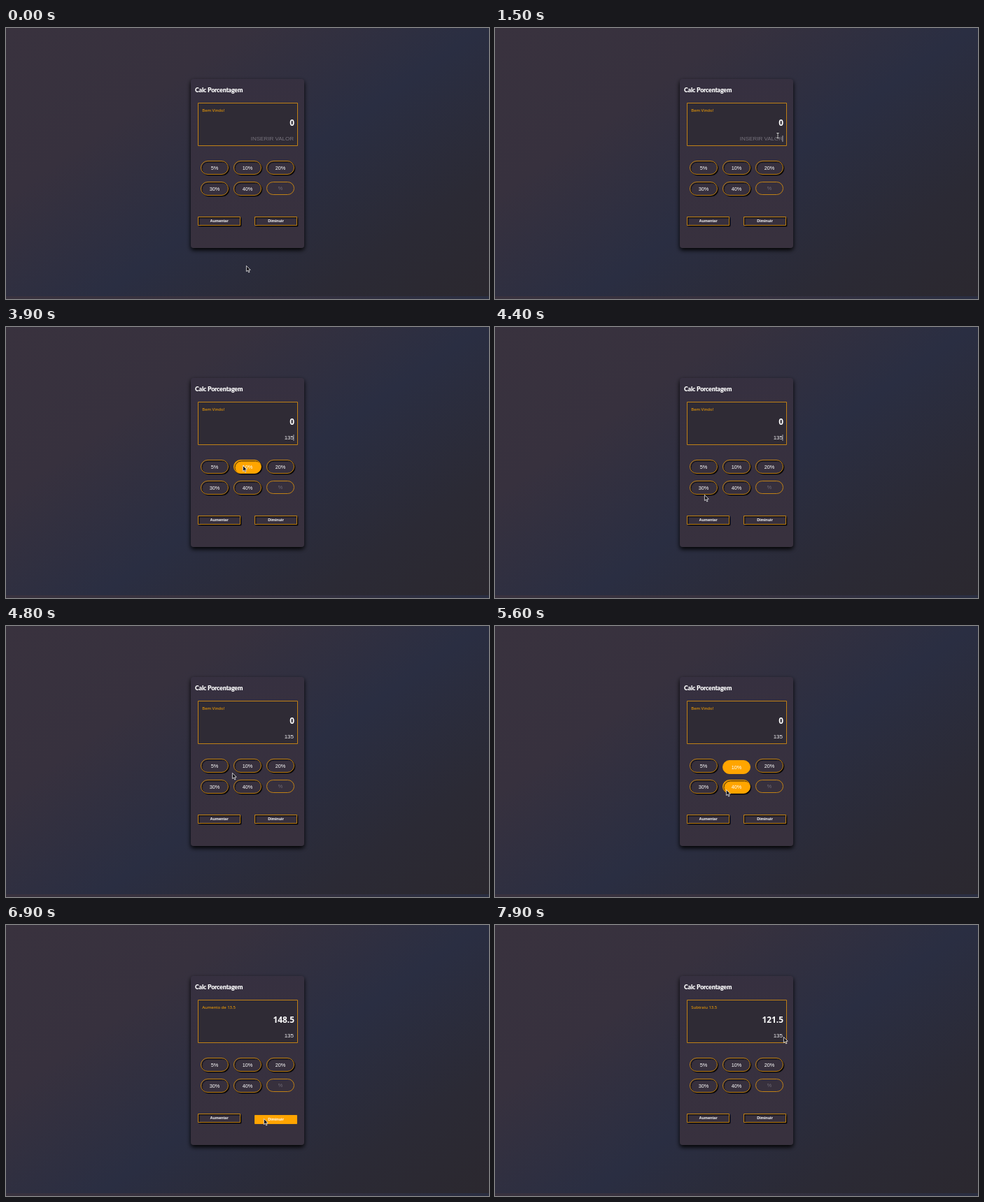
Write an HTML page with a canvas that moves like this. It is 690 by 388 pixels and loops after 8000 ms.

```html
<!DOCTYPE html>
<html lang="pt-BR">
<head>
<meta charset="utf-8">
<title>Calc</title>
<style>
  html, body { margin: 0; width: 100%; height: 100%; overflow: hidden; background: #332f3c; }
  canvas { display: block; width: 690px; height: 388px; }
</style>
</head>
<body>
<canvas id="stage"></canvas>
<script>
const W = 690, H = 388, PAGE = 384, LOOP = 8000, STEP = 100;
const ORANGE = '#ffa500', EDGE = '#cf8912', WHITE = '#fff', FACE = '#37303d';
const ARIAL = '"Liberation Sans", Arial, sans-serif';
const HUMAN = '"Noto Sans", sans-serif';

const canvas = document.getElementById('stage');
const ctx = canvas.getContext('2d');
const ratio = window.devicePixelRatio || 1;
canvas.width = W * ratio;
canvas.height = H * ratio;

// Moments of the session, in ms
const focusField = 1500, press10 = 5200, pressAdd = 6300, pressCut = 6900, blur = 7600;
const keyTimes = [2300, 2500, 2700];

// Each sweep eases along a quadratic curve: from, to, bend point, end point
const home = { x: 343, y: 340 };
const sweep = (from, to, bendX, bendY, x, y) => ({ from, to, bendX, bendY, x, y });
const sweeps = [
  sweep(700, focusField, 596, 290, 404, 154),
  sweep(3200, 3900, 190, 226, 338, 198),
  sweep(3900, 4300, 440, 200, 284, 238),
  sweep(4300, 4800, 370, 250, 323, 210),
  sweep(4800, press10, 332, 204, 341, 206),
  sweep(5500, 5600, 336, 220, 330, 234),
  sweep(5600, pressAdd, 240, 300, 295, 277),
  sweep(6400, pressCut, 330, 283, 368, 277),
  sweep(7100, 7700, 425, 235, 412, 160)
];

function pointerAt(t) {
  let p = home;
  for (const s of sweeps) {
    if (t <= s.from) break;
    const k = Math.min(1, (t - s.from) / (s.to - s.from));
    const u = (1 - Math.cos(Math.PI * k)) / 2;
    const curve = (a, b, c) => Math.round((1 - u) ** 2 * a + 2 * u * (1 - u) * b + u * u * c);
    p = { x: curve(p.x, s.bendX, s.x), y: curve(p.y, s.bendY, s.y) };
  }
  return p;
}

const pills = ['5%', '10%', '20%', '30%', '40%', '%'].map((label, i) => ({
  label, x: 278.5 + 47 * (i % 3), y: 190.5 + 30 * Math.floor(i / 3),
  w: 39, h: 19, r: 9.5, font: '7.35px ' + ARIAL, drop: 2.6
}));
const custom = Object.assign(pills.pop(), { h: 18 });
const bars = ['Aumentar', 'Diminuir'].map((label, i) => ({
  label, x: 274.5 + 81 * i, y: 270.5, w: 60, h: 12, r: 0, font: 'bold 5.6px ' + ARIAL, drop: 1.8
}));
const buttons = [...pills, ...bars];
const field = { x: 278, y: 150, w: 133, h: 17 };

const inside = (p, b) => p.x >= b.x && p.x <= b.x + b.w && p.y >= b.y && p.y <= b.y + b.h;

function focusedAt(t) {
  if (t >= blur || t < focusField) return null;
  if (t >= pressCut) return bars[1];
  if (t >= pressAdd) return bars[0];
  return t >= press10 ? pills[1] : field;
}

// The caret blinks every 600 ms, counted from the last key
function caretOn(t) {
  if (focusedAt(t) !== field) return false;
  const since = t - [focusField + STEP, ...keyTimes].filter(k => k <= t).pop();
  return !(since >= 0) || Math.floor(since / 600) % 2 === 0;
}

function text(str, x, y, font, color, align = 'left', spacing = 0) {
  ctx.font = font;
  ctx.fillStyle = color;
  ctx.textAlign = align;
  ctx.letterSpacing = spacing + 'px';
  ctx.fillText(str, x, y);
}

function box(b, fill, stroke, dy = 0) {
  ctx.beginPath();
  ctx.roundRect(b.x, b.y + dy, b.w, b.h, b.r || 0);
  ctx.fillStyle = fill;
  ctx.fill();
  if (!stroke) return;
  ctx.strokeStyle = stroke;
  ctx.lineWidth = 0.9;
  ctx.stroke();
}

function shadow(size, dx, dy, color) {
  ctx.shadowColor = color;
  ctx.shadowBlur = size * ratio;
  ctx.shadowOffsetX = dx * ratio;
  ctx.shadowOffsetY = dy * ratio;
}
const noShadow = () => shadow(0, 0, 0, 'transparent');

function fade(x0, y0, x1, y1, stops) {
  const g = ctx.createLinearGradient(x0, y0, x1, y1);
  for (const [at, color] of stops) g.addColorStop(at, color);
  return g;
}

function background() {
  const angle = 145 * Math.PI / 180;
  const sx = Math.sin(angle), sy = -Math.cos(angle);
  const half = (W * sx + PAGE * sy) / 2;
  ctx.fillStyle = fade(
    W / 2 - sx * half, PAGE / 2 - sy * half, W / 2 + sx * half, PAGE / 2 + sy * half,
    [[0, '#39323e'], [0.28, '#37313e'], [0.55, '#2a2e42'], [0.8, '#2b2a35'], [1, '#2b282f']]
  );
  ctx.fillRect(0, 0, W, PAGE);
  ctx.save();
  ctx.translate(0, PAGE);
  ctx.fillRect(0, 0, W, H - PAGE);
  ctx.restore();
}

function panel() {
  shadow(6, 0, 3, '#000');
  box({ x: 264, y: 73, w: 162, h: 242, r: 4 }, fade(264, 73, 290, 315, [[0, '#363040'], [1, '#38313e']]));
  noShadow();
  text('Calc Porcentagem', 270, 92, '900 8.8px Lato, sans-serif', WHITE, 'left', -0.2);
  box({ x: 274.5, y: 107.5, w: 142, h: 61 }, '#2f2b35', EDGE);
}

function drawButton(b, t, p) {
  const pressed = focusedAt(t) === b;
  const dy = pressed ? 2 : 0;
  const lit = pressed || inside(p, b);
  if (!pressed) shadow(0.8, 1.3, 1.3, '#000');
  box(b, lit ? ORANGE : FACE, lit ? ORANGE : EDGE, dy);
  noShadow();
  text(b.label, b.x + b.w / 2, b.y + b.h / 2 + dy + b.drop, b.font, WHITE, 'center');
}

function display(t) {
  let note = 'Bem Vindo!', total = '0';
  if (t > pressCut) [note, total] = ['Subtraiu 13.5', '121.5'];
  else if (t > pressAdd) [note, total] = ['Aumento de 13.5', '148.5'];
  text(note, 280.3, 119.8, '500 5.95px ' + HUMAN, ORANGE);
  text(total, 412, 140, 'bold 11.9px ' + HUMAN, WHITE, 'right');

  const typed = '135'.slice(0, keyTimes.filter(k => t >= k).length);
  text(typed || 'INSERIR VALOR', 411, 161, '8.02px ' + ARIAL, typed ? '#f0eff1' : '#77737d', 'right');
  if (caretOn(t)) {
    ctx.fillStyle = '#d8d6dc';
    ctx.fillRect(410.6, 154, 0.7, 9);
  }
}

function arrow({ x, y }) {
  const tail = [[0.4, 0.4], [0.4, 8.6], [2.3, 7], [3.7, 10], [5, 9.4], [3.7, 6.5], [6.2, 6.3]];
  ctx.beginPath();
  tail.forEach(([px, py]) => ctx.lineTo(x + px, y + py));
  ctx.closePath();
  ctx.fillStyle = '#17151a';
  ctx.fill();
  ctx.strokeStyle = '#e8e8ea';
  ctx.lineWidth = 0.8;
  ctx.lineJoin = 'round';
  ctx.stroke();
}

function beam({ x, y }) {
  for (const [color, width] of [['#18161b', 2], ['#e8e8ea', 0.9]]) {
    ctx.beginPath();
    for (const dy of [-3.5, 3.5]) {
      ctx.moveTo(x - 1.7, y + dy);
      ctx.lineTo(x + 1.7, y + dy);
    }
    ctx.moveTo(x, y - 3.5);
    ctx.lineTo(x, y + 3.5);
    ctx.strokeStyle = color;
    ctx.lineWidth = width;
    ctx.stroke();
  }
}

function draw(now) {
  const t = Math.floor((now % LOOP) / STEP) * STEP;
  const p = pointerAt(t);
  ctx.setTransform(ratio, 0, 0, ratio, 0, 0);
  background();
  panel();
  display(t);
  buttons.forEach(b => drawButton(b, t, p));
  box(custom, FACE, EDGE);
  text(custom.label, 392, 232, '7.2px ' + ARIAL, '#706a76', 'center');
  (inside(p, field) || inside(p, custom) ? beam : arrow)(p);
}

let start;
function frame(now) {
  start ??= now;
  draw(now - start);
  requestAnimationFrame(frame);
}
requestAnimationFrame(frame);
</script>
</body>
</html>
```
